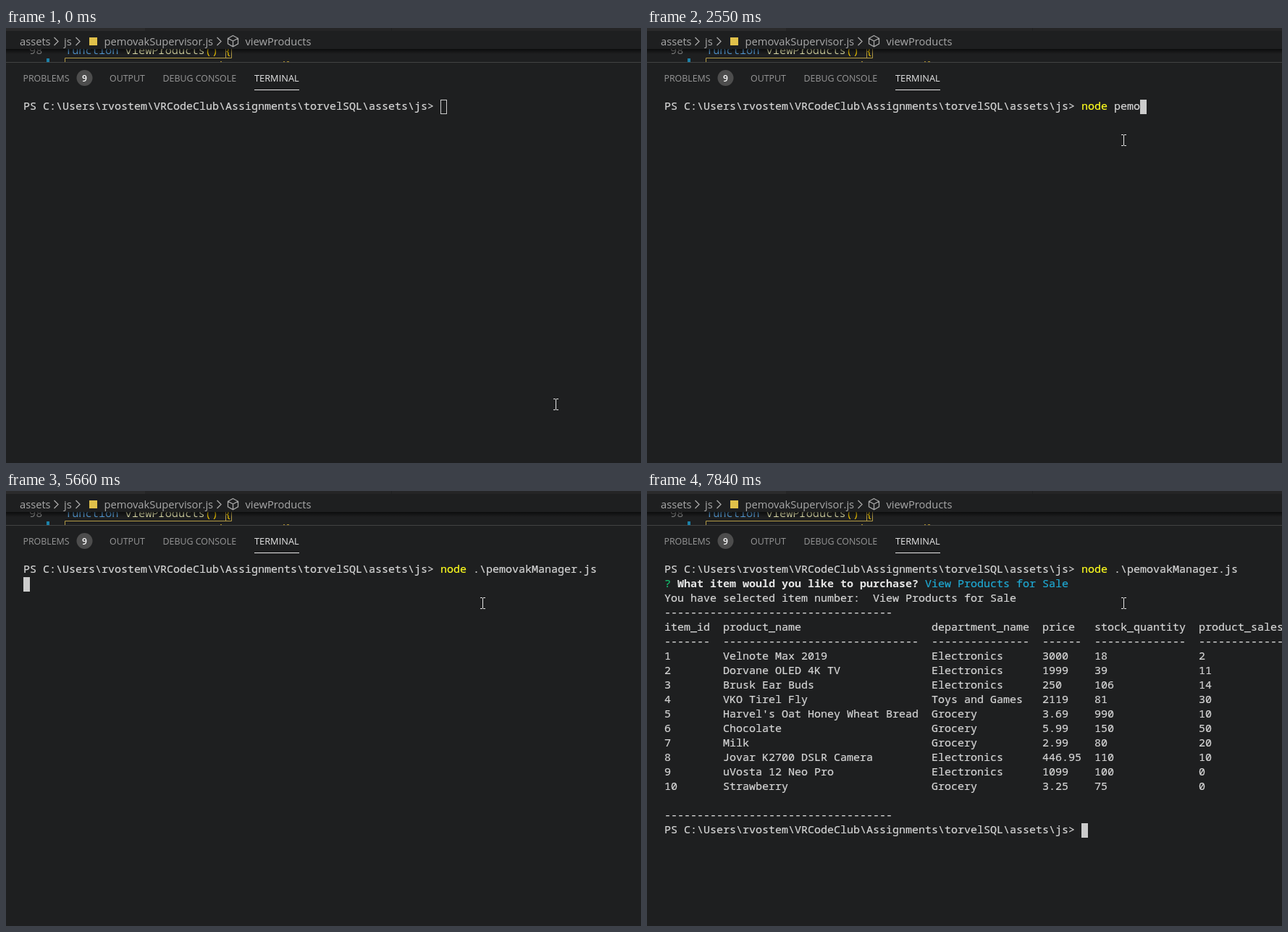
An HTML page for the animation above (8000 ms loop, 877x601 px).

```html
<!DOCTYPE html>
<html lang="en">
<head>
<meta charset="utf-8">
<title>Terminal session</title>
<style>
  html, body { margin: 0; width: 100%; height: 100%; overflow: hidden; background: #1e1f20; }
  svg { display: block; width: 877px; height: 601px; }
  text { white-space: pre; }
  .ui { font-family: "Open Sans", "Noto Sans", sans-serif; }
  .crumb { font-size: 14.7px; fill: #a9a9a9; }
  .tab { font-size: 12.4px; fill: #979797; }
  .tab.on { font-size: 12.8px; fill: #e7e7e7; }
  .code, #term { font-family: "Noto Sans Mono", "DejaVu Sans Mono", monospace; }
  .code { font-size: 15.3px; }
  #term { font-size: 15px; color: #d6d6d6; }
  #term text { fill: currentColor; stroke: currentColor; stroke-width: .2; }
  #term .cmd { color: #ffff1e; }
  #term .ok { color: #16c070; }
  #term .pick { color: #1fa9d3; }
  #term .ask { color: #e5e5e5; font-weight: 700; stroke: none; }
  .line { fill: none; stroke: #a9a9a9; stroke-width: 1.3; }
</style>
</head>
<body>
<svg viewBox="0 0 877 601">
  <defs>
    <linearGradient id="shade" x2="0" y2="1">
      <stop offset="0" stop-color="#000" stop-opacity=".6"/>
      <stop offset="1" stop-color="#000" stop-opacity="0"/>
    </linearGradient>
    <clipPath id="peek"><rect y="29" width="877" height="18"/></clipPath>
  </defs>
  <rect width="877" height="601" fill="#1e1f20"/>
  <rect width="877" height="4" fill="#252526"/>
  <rect width="192" height="4" fill="#2b2b2c"/>
  <rect x="532" width="1" height="4" fill="#1e1f20"/>

  <!-- sliver of the editor -->
  <g clip-path="url(#peek)">
    <text class="code" x="32" y="36" fill="#858585">98</text>
    <text class="code" x="82" y="36" fill="#569cd6">function <tspan fill="#dcdcaa">viewProducts</tspan><tspan fill="#e8c000">() {</tspan></text>
    <path d="M81.5 47V41.5H311.5V26M303.5 26V41" fill="none" stroke="#b39a45"/>
    <rect x="56" y="42" width="4" height="5" fill="#1b81a8"/>
    <path d="M296 46.5h2M383 46.5h2M388 46.5h3" stroke="#a98d2c"/>
    <rect y="29" width="877" height="7" fill="url(#shade)"/>
  </g>

  <!-- breadcrumbs -->
  <g class="ui crumb">
    <text x="19" y="24">assets</text>
    <text x="80" y="24">js</text>
    <text x="135.5" y="24">pemovakSupervisor.js</text>
    <text x="330.5" y="24">viewProducts</text>
  </g>
  <path class="line" d="M66.5 13l5.5 5.5-5.5 5.5M96.5 13l5.5 5.5-5.5 5.5M291.5 13l5.5 5.5-5.5 5.5"/>
  <rect x="115" y="13" width="11" height="11" fill="#e0c04a"/>
  <path class="line" d="M313.5 10.5l7 3.8v7.6l-7 3.9-7-3.9v-7.6zM306.5 14.3l7 3.7 7-3.7M313.5 18v7.8"/>

  <!-- panel tabs -->
  <rect y="47" width="877" height="1" fill="#424242"/>
  <g class="ui">
    <text class="tab" x="23.5" y="74">PROBLEMS</text>
    <circle cx="108.5" cy="69" r="11" fill="#4d4d4d"/>
    <text x="108.5" y="73.5" text-anchor="middle" font-size="12" font-weight="600" fill="#fff">9</text>
    <text class="tab" x="143" y="74">OUTPUT</text>
    <text class="tab" x="216.5" y="74">DEBUG CONSOLE</text>
    <text class="tab on" x="343" y="74">TERMINAL</text>
  </g>
  <rect x="343" y="85" width="62" height="1" fill="#e7e7e7"/>

  <g id="term"></g>
  <rect id="caret" stroke="#cccccc" width="8" height="19"/>
  <path id="mouse" d="M-3.5 -7.5H-.5M.5 -7.5H3.5M0 -7V7M-3.5 7.5H-.5M.5 7.5H3.5" fill="none" stroke="#e6e6e6"/>
</svg>
<script>
const LOOP = 8000, CELL = 9, ROW = 20, LEFT = 24, TOP = 99;
const PROMPT = 'PS C:\\Users\\rvostem\\VRCodeClub\\Assignments\\torvelSQL\\assets\\js> ';
const TYPED = 'node pemovakM';
const FULL = 'node .\\pemovakManager.js';
const RULE = '-'.repeat(35);
const CHOICE = 'View Products for Sale';

const keyTimes = [1080, 1230, 1310, 1470, 1850, 2080, 2250, 2400, 2550, 3560, 3640, 3810, 4570];
const COMPLETE = 5050, ENTER = 5660, MENU = 6060, PICKED = 7690, TABLE = 7770, DONE = 7840;
const FOCUS = 450;

// time, x, y
const mousePath = [
  [0, 759.5, 520], [70, 752.5, 493], [146, 731.5, 417], [222, 703.5, 316],
  [298, 678.5, 226], [374, 663.5, 172], [FOCUS, 658.5, 155]
];

const cols = [0, 9, 41, 58, 66, 82];
const heads = ['item_id', 'product_name', 'department_name', 'price', 'stock_quantity', 'product_sales'];
const widths = [7, 30, 15, 6, 14, 13];
const goods = [
  'Velnote Max 2019|Electronics|3000|18|2',
  'Dorvane OLED 4K TV|Electronics|1999|39|11',
  'Brusk Ear Buds|Electronics|250|106|14',
  'VKO Tirel Fly|Toys and Games|2119|81|30',
  "Harvel's Oat Honey Wheat Bread|Grocery|3.69|990|10",
  'Chocolate|Grocery|5.99|150|50',
  'Milk|Grocery|2.99|80|20',
  'Jovar K2700 DSLR Camera|Electronics|446.95|110|10',
  'uVosta 12 Neo Pro|Electronics|1099|100|0',
  'Strawberry|Grocery|3.25|75|0'
];

const term = document.getElementById('term');
const caret = document.getElementById('caret');
const mouse = document.getElementById('mouse');

function put(row, col, str, cls = '') {
  const el = document.createElementNS('http://www.w3.org/2000/svg', 'text');
  el.setAttribute('x', LEFT + col * CELL);
  el.setAttribute('y', TOP + 14 + row * ROW);
  el.setAttribute('class', cls);
  el.textContent = str;
  term.append(el);
}

function putCells(row, cells) {
  cells.forEach((cell, i) => put(row, cols[i], cell));
}

function setCaret(row, col, filled = true) {
  caret.setAttribute('x', LEFT + col * CELL + 0.5);
  caret.setAttribute('y', TOP + row * ROW + 0.5);
  caret.setAttribute('fill', filled ? '#cccccc' : 'none');
}

function drawCommand(t) {
  const count = keyTimes.filter(k => k <= t).length;
  const cmd = t >= COMPLETE ? FULL : TYPED.slice(0, count);
  put(0, 0, PROMPT);
  put(0, PROMPT.length, cmd.slice(0, 4), 'cmd');
  put(0, PROMPT.length + 5, cmd.slice(5));
  setCaret(0, PROMPT.length + cmd.length, t >= FOCUS);
}

function drawQuestion() {
  put(1, 0, '?', 'ok');
  put(1, 2, 'What item would you like to purchase?', 'ask');
}

function drawMenu() {
  put(1, 40, '(Use arrow keys)');
  put(2, 0, '> ' + CHOICE, 'pick');
  ['View Low Inventory', 'Add to Inventory', 'Add New Product', 'exit']
    .forEach((item, i) => put(3 + i, 2, item));
}

function drawTable() {
  put(3, 0, RULE);
  putCells(4, heads);
  putCells(5, widths.map(w => '-'.repeat(w)));
  goods.forEach((g, i) => putCells(6 + i, [String(i + 1), ...g.split('|')]));
  put(17, 0, RULE);
  setCaret(18, 0);
}

function drawTerm(t) {
  term.replaceChildren();
  drawCommand(t);
  if (t >= ENTER) setCaret(1, 0);
  if (t >= MENU) drawQuestion();
  if (t >= MENU && t < PICKED) drawMenu();
  if (t >= PICKED) {
    put(1, 40, CHOICE, 'pick');
    put(2, 0, 'You have selected item number:  ' + CHOICE);
    setCaret(3, 0);
  }
  if (t >= TABLE) drawTable();
  if (t >= DONE) {
    put(18, 0, PROMPT);
    setCaret(18, PROMPT.length);
  }
  caret.style.display = t >= MENU && t < PICKED ? 'none' : '';
}

const changes = [0, FOCUS, ...keyTimes, COMPLETE, ENTER, MENU, PICKED, TABLE, DONE];
const start = performance.now();
let shown = -1;

function tick() {
  const t = (performance.now() - start) % LOOP;
  const step = changes.filter(c => c <= t).length;
  if (step !== shown) {
    shown = step;
    drawTerm(t);
  }
  const [, x, y] = mousePath.filter(p => p[0] <= t).pop();
  mouse.setAttribute('transform', `translate(${x} ${y})`);
  requestAnimationFrame(tick);
}
tick();
</script>
</body>
</html>
```
